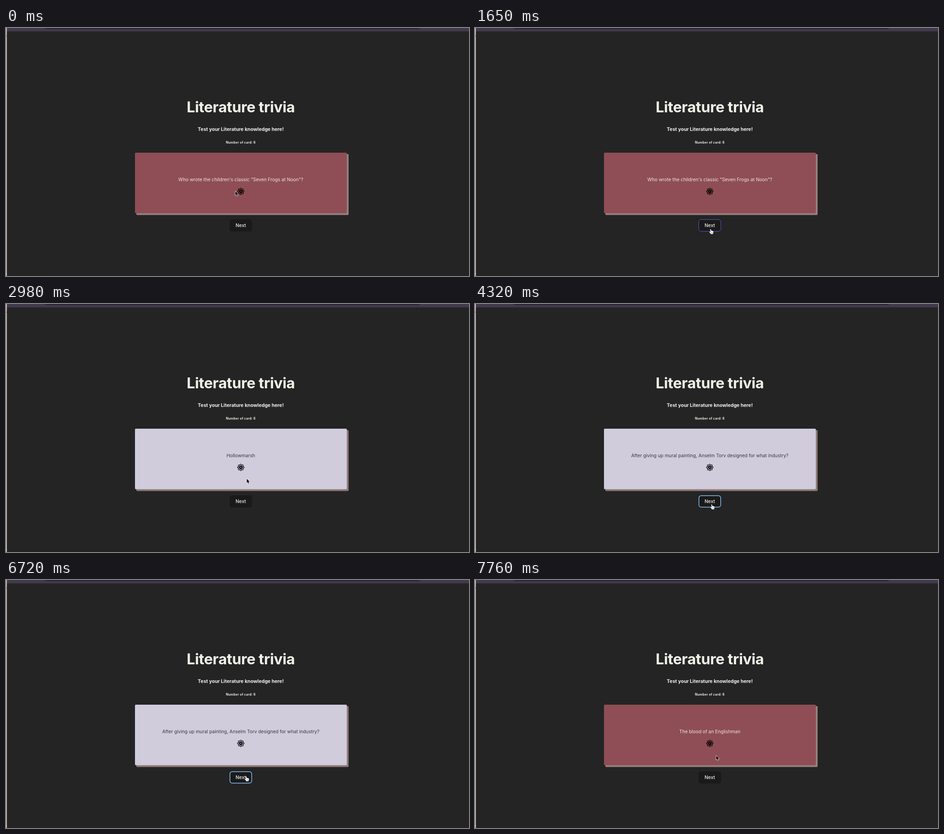
An HTML page with a canvas for the animation above (8000 ms loop, 1023 by 547 pixels).

```html
<!DOCTYPE html>
<html lang="en">
<head>
<meta charset="utf-8">
<title>Literature trivia</title>
<style>
  html, body { margin: 0; width: 100%; height: 100%; overflow: hidden; background: #242424; }
  canvas { position: absolute; left: 0; top: 0; }
  h1 {
    position: absolute; left: 14.6px; right: 0; top: 154px; margin: 0;
    font: 700 32.8px/40px Inter, sans-serif; font-optical-sizing: none;
    letter-spacing: -0.35px; text-align: center; white-space: nowrap; color: #f1f1e8;
  }
</style>
</head>
<body>
<canvas id="stage" width="1023" height="547"></canvas>
<h1>Literature trivia</h1>
<script>
const ctx = document.getElementById('stage').getContext('2d');
const LOOP = 8000;
const CENTER = 518.8;

const RED = { fill: '#8f4e55', shadow: '#967f7e', text: '#eee4e4' };
const LILAC = { fill: '#d0ccdc', shadow: '#8f7a76', text: '#3a383e' };
const HOVER = { color: '#575bd6', width: 1 };
const FOCUS = { color: '#86c0fa', width: 1.5 };

const cards = [
  { skin: RED, question: 'Who wrote the children\'s classic "Seven Frogs at Noon"?', answer: 'Mr. Tibble' },
  { skin: LILAC, question: 'Which classic novel\'s subtitle is "The Autumn Clockmaker"?', answer: 'Hollowmarsh' },
  { skin: LILAC, question: 'After giving up mural painting, Anselm Torv designed for what industry?', answer: 'Fashion' },
  { skin: RED, question: 'In the old nursery tale, what could the grumbling giant smell?', answer: 'The blood of an Englishman' }
];

const arrow = (x, y) => ({ cursor: drawArrow, x, y });
const hand = (x, y) => ({ cursor: drawHand, x, y });
const ask = card => ({ card, side: 'question' });
const flip = { side: 'answer' };
const back = { side: 'question' };
const ring = ring => ({ ring });

// Each step changes part of the state from its time on.
const steps = [
  [0, ask(0), ring(null), arrow(507, 359.5)],
  [150, flip],
  [1200, back],
  [1350, arrow(510, 375)],
  [1500, arrow(517, 414)],
  [1650, hand(517, 443), ring(HOVER)],
  [1800, ask(1), ring(FOCUS)],
  [2090, arrow(520, 405)],
  [2240, arrow(520, 366)],
  [2530, arrow(524, 372)],
  [2680, arrow(529, 380)],
  [2830, arrow(532, 385)],
  [2980, flip, ring(null)],
  [3580, back],
  [3730, arrow(531, 391)],
  [3880, arrow(529, 408)],
  [4020, hand(523, 434), ring(HOVER)],
  [4170, hand(519.5, 441.5)],
  [4320, ask(2), ring(FOCUS)],
  [4620, arrow(532, 412)],
  [4770, arrow(538, 387)],
  [5220, flip, ring(null)],
  [5970, back],
  [6270, arrow(537, 391)],
  [6420, arrow(535, 408)],
  [6570, hand(529, 429), ring(HOVER)],
  [6720, hand(527, 432.5), ring(FOCUS)],
  [6870, ask(3)],
  [7160, arrow(532, 411)],
  [7310, arrow(533, 387)],
  [7610, ring(null)],
  [7760, flip]
];

function stateAt(time) {
  const state = {};
  for (const [start, ...changes] of steps) {
    if (start > time) break;
    Object.assign(state, ...changes);
  }
  return state;
}

function box(x, y, w, h, color) {
  ctx.fillStyle = color;
  ctx.fillRect(x, y, w, h);
}

function roundBox(x, y, w, h, r, color) {
  ctx.beginPath();
  ctx.roundRect(x, y, w, h, r);
  ctx.fillStyle = color;
  ctx.fill();
}

function label(text, y, size, weight, color, spacing = 0) {
  ctx.font = `${weight} ${size}px Inter, sans-serif`;
  ctx.letterSpacing = spacing + 'px';
  ctx.textAlign = 'center';
  ctx.fillStyle = color;
  ctx.fillText(text, CENTER, y);
}

function drawWindow() {
  box(0, 0, 1023, 547, '#242424');
  box(0, 0, 1023, 7.5, '#42394d');
  roundBox(84, -10, 832, 12.5, 5, '#2c2537');
  box(0, 0, 2, 547, '#cbb6b0');
  box(2, 8, 0.6, 539, '#1b1b1b');
  box(0, 17, 2, 2, '#8d827f');
  box(0, 541, 2, 2, '#e6e0dc');
  box(2, 546, 1021, 1, '#1f1f1f');
}

function drawFlower() {
  ctx.save();
  ctx.translate(CENTER, 360.4);
  ctx.strokeStyle = '#000';
  ctx.lineWidth = 1.1;
  ctx.lineJoin = 'round';
  for (let i = 0; i < 8; i++) {
    ctx.beginPath();
    ctx.moveTo(0, -2);
    ctx.bezierCurveTo(-2.6, -4.6, -2.2, -6.2, 0, -7.5);
    ctx.bezierCurveTo(2.2, -6.2, 2.6, -4.6, 0, -2);
    ctx.stroke();
    ctx.rotate(Math.PI / 4);
  }
  ctx.beginPath();
  ctx.arc(0, 0, 1.7, 0, Math.PI * 2);
  ctx.stroke();
  ctx.restore();
}

function drawCard({ skin, ...text }, side) {
  roundBox(288, 278, 469, 134.4, 2, skin.shadow);
  roundBox(285, 275, 468, 133.5, 2, skin.fill);
  label(text[side], 337.7, 10.26, 400, skin.text);
  drawFlower();
}

function drawButton(ring) {
  roundBox(494, 422, 49.6, 26.8, 5.3, '#1a1a1a');
  if (ring) {
    const inset = ring.width / 2;
    ctx.beginPath();
    ctx.roundRect(494 + inset, 422 + inset, 49.6 - ring.width, 26.8 - ring.width, 5);
    ctx.strokeStyle = ring.color;
    ctx.lineWidth = ring.width;
    ctx.stroke();
  }
  label('Next', 439.2, 10.3, 500, '#f0f0f0');
}

function outline(fill, stroke, width) {
  ctx.lineJoin = 'round';
  ctx.strokeStyle = stroke;
  ctx.lineWidth = width;
  ctx.stroke();
  ctx.fillStyle = fill;
  ctx.fill();
}

function drawArrow() {
  const points = [[0, 0.8], [0, 9.4], [2, 7.6], [3.4, 11], [5, 10.3], [3.6, 7.1], [6.3, 7.1]];
  ctx.beginPath();
  for (const [x, y] of points) ctx.lineTo(x, y);
  ctx.closePath();
  outline('#000', '#fff', 1.3);
}

function drawHand() {
  ctx.beginPath();
  ctx.moveTo(2.6, 1.7);
  ctx.bezierCurveTo(2.4, 0.3, 4.2, 0.2, 4.4, 1.6);
  ctx.lineTo(5, 4.2);
  ctx.quadraticCurveTo(6.1, 3.5, 6.7, 4.5);
  ctx.quadraticCurveTo(7.8, 3.9, 8.3, 5);
  ctx.quadraticCurveTo(9.7, 4.7, 9.9, 6.2);
  ctx.quadraticCurveTo(10, 8.4, 8.9, 10);
  ctx.lineTo(8.8, 11.4);
  ctx.lineTo(4, 11.4);
  ctx.quadraticCurveTo(3.2, 9.6, 1, 7.4);
  ctx.bezierCurveTo(0, 6.2, 1.4, 5.4, 2.4, 6.4);
  ctx.lineTo(3.4, 7.1);
  ctx.closePath();
  outline('#fff', '#000', 0.9);
  ctx.beginPath();
  for (const x of [5.1, 6.5, 7.9]) {
    ctx.moveTo(x, 7.4);
    ctx.lineTo(x, 9.6);
  }
  ctx.lineWidth = 0.4;
  ctx.stroke();
}

function draw(now) {
  const state = stateAt(now % LOOP);
  drawWindow();
  label('Test your Literature knowledge here!', 226.7, 10.6, 700, '#f0f0ec');
  label('Number of card: 6', 255.4, 6.9, 700, '#f0f0ec', 0.28);
  drawCard(cards[state.card], state.side);
  drawButton(state.ring);
  ctx.save();
  ctx.translate(state.x, state.y);
  state.cursor();
  ctx.restore();
}

let begin;
function tick(now) {
  begin ??= now;
  draw(now - begin);
  requestAnimationFrame(tick);
}
requestAnimationFrame(tick);
</script>
</body>
</html>
```
